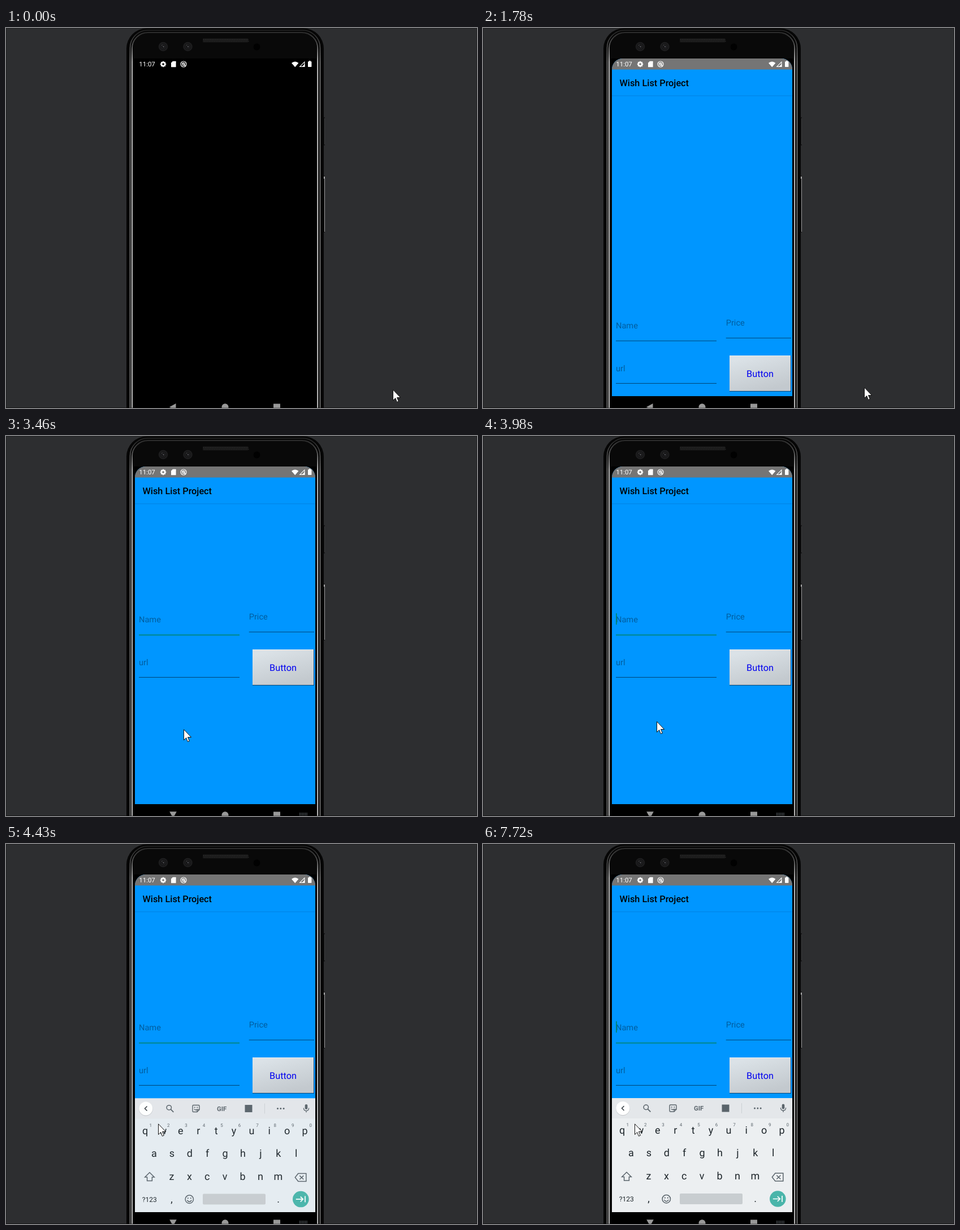
Write an HTML page with a canvas that moves like this. It is 833x673 px and loops after 8000 ms.

```html
<!DOCTYPE html>
<html lang="en">
<head>
<meta charset="utf-8">
<title>Wish List Project</title>
<style>
html, body { margin: 0; width: 100%; height: 100%; overflow: hidden; background: #2d2e30; }
canvas { display: block; }
</style>
</head>
<body>
<canvas id="stage" width="833" height="673"></canvas>
<script>
const ctx = document.getElementById('stage').getContext('2d');
const LOOP = 8000;
const BLUE = '#0096ff', TEAL = '#008577', INK = '#1c2429', ICON = '#5a646b';
const SCREEN = { x: 228, y: 54, w: 319, h: 598 };

// Pointer path: time, x, y
const PATH = [
  [0, 684, 640], [1779, 684, 640], [1780, 674, 636], [1900, 620, 609],
  [2050, 492, 540], [2160, 412, 498], [2270, 335, 470], [2340, 303, 466],
  [2430, 313, 506], [2500, 316, 524], [3300, 316, 524], [3900, 307, 505],
  [4080, 307, 505], [4380, 269, 495], [6419, 269, 495], [6420, 268, 495]
];
const CARET_ON = [[3770, 4270], [4770, 5240], [5780, 6240], [6720, 7210], [7720, 8000]];

const clamp01 = v => Math.max(0, Math.min(1, v));

function rect(x, y, w, h, color) {
  ctx.fillStyle = color;
  ctx.fillRect(x, y, w, h);
}

function round(x, y, w, h, r, color) {
  ctx.beginPath();
  ctx.roundRect(x, y, w, h, r);
  ctx.fillStyle = color;
  ctx.fill();
}

function disc(x, y, r, color) {
  ctx.beginPath();
  ctx.arc(x, y, r, 0, Math.PI * 2);
  ctx.fillStyle = color;
  ctx.fill();
}

function stroke(color, width) {
  ctx.strokeStyle = color;
  ctx.lineWidth = width;
  ctx.stroke();
}

function ring(x, y, r, color, width) {
  ctx.beginPath();
  ctx.arc(x, y, r, 0, Math.PI * 2);
  stroke(color, width);
}

function fillPath(d, x, y, color) {
  ctx.save();
  ctx.translate(x, y);
  ctx.fillStyle = color;
  ctx.fill(new Path2D(d));
  ctx.restore();
}

function linePath(d, x, y, color, width) {
  ctx.save();
  ctx.translate(x, y);
  ctx.strokeStyle = color;
  ctx.lineWidth = width;
  ctx.stroke(new Path2D(d));
  ctx.restore();
}

function text(str, x, y, size, color, align = 'left', weight = 400) {
  ctx.font = `${weight} ${size}px Roboto, sans-serif`;
  ctx.textRendering = 'geometricPrecision';
  ctx.textAlign = align;
  ctx.fillStyle = color;
  ctx.fillText(str, x, y);
}

function rim(left, right, top, r, color, width) {
  const fade = ctx.createLinearGradient(0, 4, 0, 60);
  fade.addColorStop(0, '#262626');
  fade.addColorStop(0.4, '#4c4c4c');
  fade.addColorStop(1, color);
  ctx.beginPath();
  ctx.roundRect(left, top, right - left, 760, r);
  stroke(fade, width);
}

function drawPhone() {
  rect(0, 0, 833, 673, '#1f2021');
  rect(1, 1, 831, 671, '#2d2e30');

  rect(561, 158, 3, 50, '#161617');
  rect(563, 160, 1, 46, '#3a3a3b');
  rect(561, 262, 3, 100, '#101010');
  rect(563, 263, 1, 98, '#9a9a9a');
  rect(562, 263, 2, 4, '#a8a8a8');

  round(213, 0.5, 349, 760, 36, '#060606');
  rim(219.5, 555.5, 4, 31, '#8b8b8b', 1.4);
  round(222, 8, 331, 760, 28, '#090909');
  rim(223, 551.2, 8, 28, '#cfcfcf', 1.8);
  rect(226, 54, 323, 619, '#000');

  for (const x of [278, 321.5]) {
    disc(x, 33, 8.3, '#1d1d1e');
    disc(x, 33, 5.5, '#111112');
    ring(x, 33, 4, '#29292b', 1);
    disc(x + 0.5, 33, 1.6, '#444448');
    disc(x - 2, 30.5, 1, '#39393c');
  }
  round(348, 18.5, 80, 7, 1, '#191919');
  for (let x = 349; x < 428; x += 3) {
    rect(x, 19.5, 1.5, 2, '#292929');
    rect(x + 1, 22.5, 1.5, 2, '#242424');
  }
  disc(443.5, 33.5, 6, '#010101');
}

function drawStatus() {
  const white = '#fff';
  text('11:07', 235.2, 68.2, 11.5, white);

  ctx.save();
  ctx.translate(278, 64);
  for (let i = 0; i < 8; i++) {
    rect(-1.2, -5.2, 2.4, 2.4, white);
    ctx.rotate(Math.PI / 4);
  }
  ctx.restore();
  ring(278, 64, 2.9, white, 2.2);

  fillPath('M3 0H8Q8.6 0 8.6 .6V10Q8.6 10.6 8 10.6H.6Q0 10.6 0 10V3Z', 292, 58.7, white);
  ring(314, 64, 5, white, 1.2);
  ring(314, 64, 2.4, white, 1.1);
  linePath('M-2 -2L4 4', 314, 64, white, 1.3);

  fillPath('M0 3Q6.2 -2 12.4 3L6.2 10.2Z', 505, 59, white);
  linePath('M.7 9.4H8.9V1.2Z', 519, 59, white, 1.1);
  fillPath('M4 9.9H9.4V4.5Z', 519, 59, white);
  rect(536, 58, 2.6, 1.5, white);
  round(534, 59.2, 6.4, 9.8, 0.7, white);
}

function drawNav(t) {
  const gray = '#999';
  const turn = clamp01((t - 3200) / 150);
  ctx.save();
  ctx.translate(295.5, 671.2 - turn);
  ctx.rotate(-Math.PI / 2 * turn);
  fillPath('M-6.5 0L5 -6.3V6.3Z', 0, 0, gray);
  ctx.restore();
  disc(387.5, 671.3, 6, gray);
  rect(473, 665.5, 12, 12, gray);
  if (t >= 3200) {
    for (let y = 667.6; y < 673; y += 2.5)
      for (let x = 519; x < 532; x += 2.5) rect(x, y, 1.2, 1.2, '#8e9aa2');
  }
}

function drawField(label, x, y, w, baseline, focused) {
  text(label, x, baseline, 14.62, 'rgba(0,0,0,.38)');
  if (focused) rect(x, y, w, 1.7, TEAL);
  else rect(x, y, w, 1, 'rgba(0,0,0,.56)');
}

function drawButton() {
  rect(436, 580, 109, 64, 'rgba(0,20,40,.55)');
  const face = ctx.createLinearGradient(478, 580, 494, 643);
  face.addColorStop(0, '#dbe2e7');
  face.addColorStop(1, '#c3c9ce');
  rect(436, 580, 108, 63, face);
  rect(436, 580, 108, 1, '#e6ecef');
  rect(436, 642, 108, 1, '#b0b6bb');
  text('Button', 490, 618, 16.25, '#0000f0', 'center');
}

function drawApp(t) {
  rect(SCREEN.x, SCREEN.y, SCREEN.w, SCREEN.h, BLUE);
  rect(SCREEN.x, SCREEN.y, SCREEN.w, 19.5, '#757575');
  text('Wish List Project', 241.5, 103, 16.25, '#000', 'left', 500);
  rect(SCREEN.x, 119.5, SCREEN.w, 1, 'rgba(0,30,80,.17)');

  ctx.save();
  if (t >= 3200) ctx.translate(0, -202);
  drawField('Name', 235, 553.6, 178, 532, t >= 2580);
  drawField('Price', 429.7, 548.6, 115.3, 527, false);
  drawField('url', 235, 628.9, 178, 607.5, false);
  drawButton();
  if (CARET_ON.some(([on, off]) => t >= on && t < off)) rect(235, 516, 1.8, 20, TEAL);
  ctx.restore();
}

function drawToolbar() {
  rect(228, 450, 319, 36, '#e4e7ea');
  disc(247.3, 468.8, 12.4, 'rgba(0,0,0,.12)');
  disc(247.3, 468, 12, '#fff');
  linePath('M2 -4L-2 0L2 4', 247.5, 468, '#333b40', 1.5);

  ring(288.3, 466.3, 4.2, ICON, 1.5);
  linePath('M0 0L5 5', 291.3, 469.3, ICON, 1.8);

  linePath('M-6 -4.5Q-6 -6 -4.5 -6H4.5Q6 -6 6 -4.5V2L2 6H-4.5Q-6 6 -6 4.5ZM6 2H2V6M-3 1Q-.5 4 2.5 1', 336, 468, ICON, 1.4);
  disc(333.7, 466, 1, ICON);
  disc(338.3, 466, 1, ICON);

  text('GIF', 381.7, 472, 11.3, ICON, 'center', 700);
  rect(422.5, 461.5, 13, 13, ICON);
  rect(457, 459, 1, 18, '#ccd1d4');
  for (const x of [480.5, 485.8, 491.1]) disc(x, 468, 1.5, ICON);

  round(528.7, 460.5, 4.6, 9, 2.3, ICON);
  linePath('M-4.6 -1Q-4.6 4 0 4T4.6 -1M0 4V7', 531, 468, ICON, 1.3);
}

function drawKeyRow(keys, x, baseline) {
  [...keys].forEach((key, i) => text(key, x + i * 31.4, baseline, 18, INK, 'center'));
}

function drawKeyboard(t) {
  const rest = 1 - clamp01((t - 4130) / 360);
  if (rest === 1) return;
  ctx.save();
  ctx.beginPath();
  ctx.rect(228, 450, 319, 202);
  ctx.clip();
  ctx.globalAlpha = 1 - rest * rest;
  ctx.translate(0, 20 * rest * rest);

  rect(228, 450, 319, 202, '#eceff1');
  drawToolbar();
  drawKeyRow('qwertyuiop', 246, 513);
  drawKeyRow('asdfghjkl', 262, 553);
  drawKeyRow('zxcvbnm', 293, 594.3);
  [...'1234567890'].forEach((n, i) => text(n, 255.7 + i * 31.45, 500, 8, ICON, 'center'));

  linePath('M0 -7.7L8.3 .5H4.4V7H-4.4V.5H-8.3Z', 254, 589, ICON, 1.5);
  linePath('M-10 0L-4.5 -7H9.5V7H-4.5ZM-2 -3.2L5 3.5M5 -3.2L-2 3.5', 521.3, 590, ICON, 1.5);

  text('?123', 253.7, 633, 12, INK, 'center');
  text(',', 293, 634, 18, INK, 'center');
  text('.', 481.7, 634, 18, INK, 'center');
  ring(324.3, 628.7, 7.2, ICON, 1.5);
  disc(321.8, 626.7, 1.1, ICON);
  disc(326.8, 626.7, 1.1, ICON);
  linePath('M-4 1.5Q0 7 4 1.5', 324.3, 628.7, ICON, 1.4);
  round(348, 619, 111, 19, 2, '#c8cdd0');
  disc(521.3, 628.5, 14.3, '#4ab5aa');
  linePath('M-8.5 0H4M-.5 -4.5L4 0L-.5 4.5M7.7 -5.5V5.5', 521.3, 628.5, '#fff', 1.7);
  ctx.restore();
}

function pointerAt(t) {
  const next = PATH.findIndex(p => p[0] > t);
  if (next < 0) return PATH[PATH.length - 1].slice(1);
  const [t0, x0, y0] = PATH[next - 1], [t1, x1, y1] = PATH[next];
  const k = (t - t0) / (t1 - t0);
  return [Math.round(x0 + (x1 - x0) * k), Math.round(y0 + (y1 - y0) * k)];
}

function drawPointer(t) {
  const [x, y] = pointerAt(t);
  const arrow = 'M.5 .8V19.6L4.7 15.5L7.4 22.4L10.3 21.2L7.5 14.5H13.6Z';
  fillPath(arrow, x, y, '#fff');
  linePath(arrow, x, y, '#111', 1);
  if (t >= 2500 && t < 2610) disc(x - 0.5, y, 15.5, 'rgba(255,242,12,.5)');
}

function draw() {
  const t = performance.now() % LOOP;
  drawPhone();
  ctx.save();
  ctx.beginPath();
  ctx.roundRect(SCREEN.x, SCREEN.y, SCREEN.w, SCREEN.h, [19, 19, 0, 0]);
  ctx.clip();
  if (t >= 110) drawApp(t);
  drawKeyboard(t);
  drawStatus();
  ctx.restore();
  drawNav(t);
  drawPointer(t);
  rect(0, 672, 833, 1, 'rgba(0,0,0,.3)');
  requestAnimationFrame(draw);
}

draw();
</script>
</body>
</html>
```
